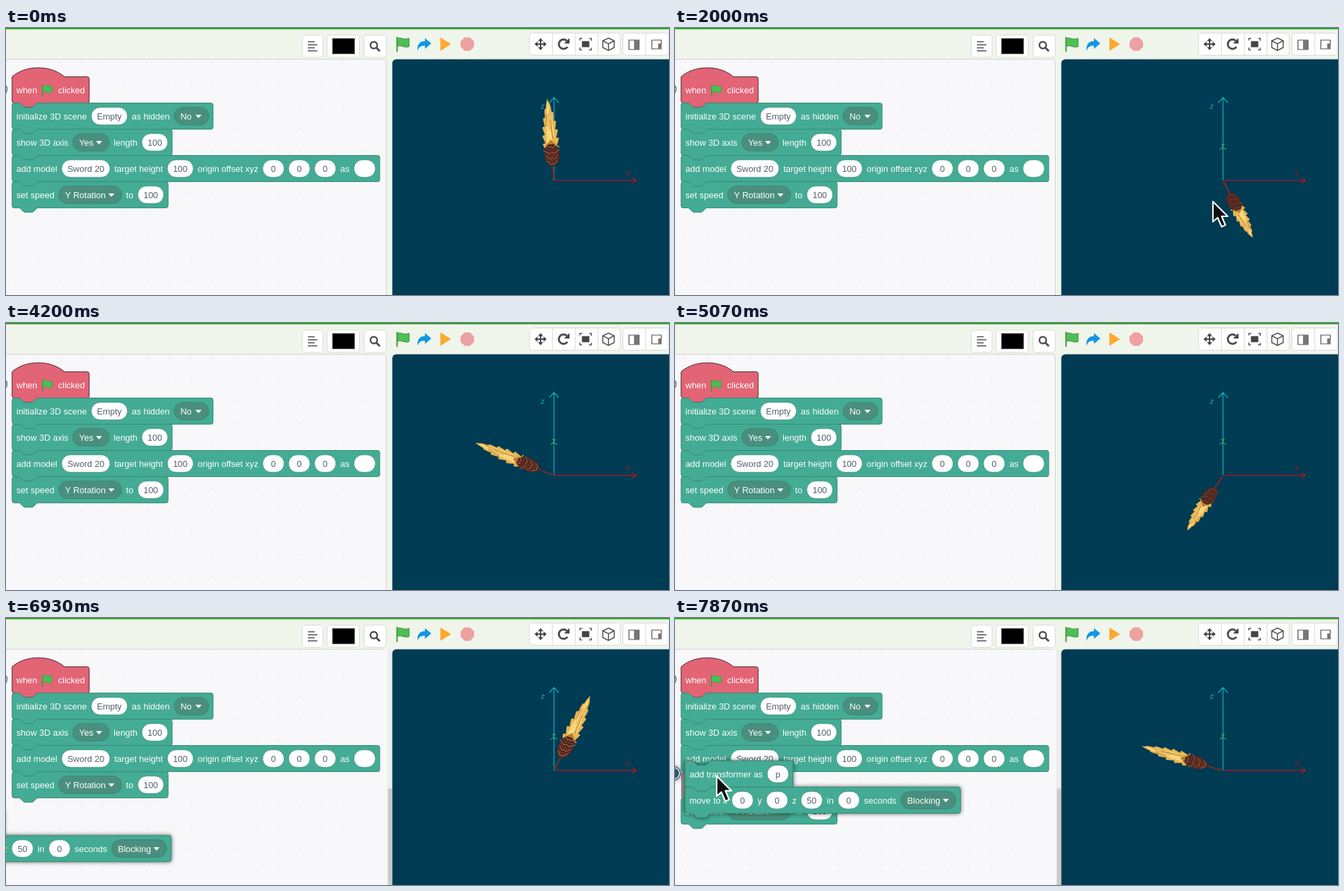
An HTML page for the animation above (8 s loop, 986 by 397 pixels).

```html
<!DOCTYPE html>
<html lang="en">
<head>
<meta charset="utf-8">
<title>Rotating 3D model</title>
<style>
html, body { margin: 0; width: 100%; height: 100%; overflow: hidden; background: #f0f5ec; }
svg { display: block; width: 986px; height: 397px; }
text { font: 13px "Liberation Sans", Arial, sans-serif; fill: #fff; }
.field { fill: #575e75; text-anchor: middle; }
.axis { fill: none; stroke-width: 1.2; }
.label { font-style: italic; font-size: 11px; }
.icon { fill: none; stroke: #4d4d4d; stroke-width: 1.5; }
#group { filter: drop-shadow(0 0 3px rgba(0,0,0,.6)); }
</style>
</head>
<body>
<svg viewBox="0 0 986 397">
  <defs>
    <pattern id="dots" x="14" y="51" width="32.5" height="32.5" patternUnits="userSpaceOnUse">
      <rect width="1.4" height="1.4" fill="#e1e3e6"/>
    </pattern>
    <clipPath id="work"><rect y="47" width="566" height="350"/></clipPath>
  </defs>
  <rect width="986" height="397" fill="#f0f5ec"/>
  <rect width="986" height="2" fill="#34ad28"/>
  <path d="M-2 398V46.500H560.500a5 5 0 0 1 5 5V398" fill="#f8f7fa" stroke="#cdd2cb"/>
  <rect y="47" width="565" height="350" fill="url(#dots)"/>
  <g id="scroll">
    <rect x="561" y="47" width="6" height="350" fill="#f8f7fa"/>
    <rect x="567" y="47" width="8" height="350" fill="#ebeeea"/>
    <path d="M568 397V256a3 3 0 0 1 6 0V397" fill="#c9cbca"/>
  </g>
  <g id="toolbar"></g>
  <path d="M574.500 397V52.500a6 6 0 0 1 6-6H986V397z" fill="#003b54"/>
  <g class="axis">
    <path d="M815 227V104M808 111L815 103.500L822 111" stroke="#08b5c4"/>
    <path d="M815 226.600H937M931 222.600L937.500 226.600L931 230.600" stroke="#c0101a"/>
    <path d="M810 180.500Q815 176.500 820 180.500M812.500 172L814.500 175M817 172L813.500 178" stroke="#35b56b"/>
  </g>
  <text class="label" x="795.500" y="120" style="fill:#1ab3c4">z</text>
  <text class="label" x="922" y="219" style="fill:#a8121c">x</text>
  <g id="sword"></g>
  <g clip-path="url(#work)">
    <g id="stack"></g>
    <rect id="marker" x="9" y="229" width="161" height="39" rx="3" fill="#8d9395"/>
    <g id="speed"></g>
    <g id="group"></g>
  </g>
  <path id="cursor" d="M1 2V32L8 26L14 39.500L19.500 37L14 24H23Z"
    fill="#111" stroke="#fff" stroke-width="2.200" stroke-linejoin="round"/>
</svg>
<script>
const $ = id => document.getElementById(id);
const LOOP = 8000, FRAME = 1000 / 15, LAST = 118;
const UNIT = 0.8125, ROW = 39, GAP = 6.5;

const pen = document.createElement('canvas').getContext('2d');
pen.font = '13px "Liberation Sans", Arial, sans-serif';
const widthOf = s => pen.measureText(s).width;

function flag(x, y, size) {
  return `<g transform="translate(${x} ${y}) scale(${size})">
    <path d="M1.500 1V21" stroke="#45993d" stroke-width="2" stroke-linecap="round"/>
    <path d="M2 2.500C7-.500 10 5.500 19 2.500V14C11 17.500 8 10.500 2 14z" fill="#4cbf56" stroke="#45993d"/></g>`;
}

// Each part returns [width, markup].
const capsule = (x, w, fill, line) =>
  `<rect x="${x}" y="6.500" width="${w}" height="26" rx="13" fill="${fill}" stroke="${line}" stroke-width=".8"/>`;

function word(x, s) {
  return [widthOf(s), `<text x="${x}" y="24.500">${s}</text>`];
}

function input(x, s) {
  const w = Math.max(32, widthOf(s) + 17);
  return [w, capsule(x, w, '#fff', '#3a8f7a') + `<text class="field" x="${x + w / 2}" y="24.500">${s}</text>`];
}

function menu(x, s) {
  const w = Math.max(51.5, widthOf(s) + 33);
  return [w, capsule(x, w, '#4a8f7e', '#38816d') + `<text x="${x + 9.5}" y="24.500">${s}</text>
    <path d="M${x + w - 19} 18h7.500l-3.750 4z" fill="#fff" stroke="#fff" stroke-linejoin="round"/>`];
}

function part(x, token) {
  if (token === '@') return [18, flag(x, 11.5, 0.82)];
  if (token[0] === '(') return input(x, token.slice(1, -1));
  if (token[0] === '[') return menu(x, token.slice(1, -1));
  return word(x, token.trim());
}

function outline(width, hat) {
  const w = width / UNIT;
  const top = hat ? 'M0 0c25-22 71-22 96 0'
    : 'M0 4a4 4 0 0 1 4-4h8c2 0 3 1 4 2l4 4c1 1 2 2 4 2h12c2 0 3-1 4-2l4-4c1-1 2-2 4-2';
  return `${top}H${w - 4}a4 4 0 0 1 4 4v40a4 4 0 0 1-4 4H48c-2 0-3 1-4 2l-4 4c-1 1-2 2-4 2h-12
    c-2 0-3-1-4-2l-4-4c-1-1-2-2-4-2H4a4 4 0 0 1-4-4z`;
}

// Markup of a block: words, (input), [menu], @ for the flag
function block(x, y, label) {
  const hat = label.includes('@');
  const [fill, line] = hat ? ['#e26475', '#3f2b30'] : ['#44ab94', '#348a74'];
  let end = GAP, inner = '';
  for (const token of label.match(/\(.*?\)|\[.*?\]|@|\w[\w ]*/g)) {
    const [w, markup] = part(end, token);
    end += w + GAP;
    inner += markup;
  }
  return `<g transform="translate(${x} ${y - 0.5})">
    <path d="${outline(end, hat)}" transform="scale(${UNIT})" fill="${fill}" stroke="${line}" stroke-width="1.200"/>${inner}</g>`;
}

const stack = (x, y, labels) => labels.map((s, i) => block(x, y + i * ROW, s)).join('');

const badge = (x, y) =>
  `<circle cx="${x}" cy="${y}" r="10.500" fill="#26343a"/>
   <circle cx="${x}" cy="${y}" r="8.700" fill="#285a70" stroke="#fff" stroke-width="1.500"/>`;

$('stack').innerHTML = badge(-8.5, 91) + stack(9, 73, [
  'when @ clicked',
  'initialize 3D scene (Empty) as hidden [No]',
  'show 3D axis [Yes] length (100)',
  'add model (Sword 20) target height (100) origin offset xyz (0) (0) (0) as ()'
]);
$('speed').innerHTML = block(9, 229, 'set speed [Y Rotation] to (100)');
$('group').innerHTML = badge(-2, 231) + stack(15, 213, [
  'add transformer as (p)',
  'move to x (0) y (0) z (50) in (0) seconds [Blocking]'
]);

// Toolbar
const button = (x, y, w, h) =>
  `<rect x="${x + 0.5}" y="${y + 0.5}" width="${w}" height="${h}" rx="4" fill="#fff" stroke="#d8dbd6"/>`;
const icon = (d, style = '') => `<path class="icon" d="${d}" style="${style}"/>`;
const at = (x, y, markup) => `<g transform="translate(${x} ${y})">${markup}</g>`;
const around = markup => [0, 90, 180, 270].map(a => `<g transform="rotate(${a})">${markup}</g>`).join('');
const solid = (d, fill = '#444') => `<path d="${d}" fill="${fill}"/>`;

$('toolbar').innerHTML =
  button(440, 10, 31, 33) + button(477, 10, 48, 33) + button(532, 10, 33, 33) +
  button(778, 7, 135, 33) + button(917, 7, 67.5, 33) +
  [812.5, 846.5, 880.5, 951.5].map(x => icon(`M${x} 8V40`, 'stroke:#d8dbd6;stroke-width:1')).join('') +
  [0, 1, 2, 3].map(i => icon(`M449 ${20.5 + i * 4.5}h${i % 2 ? 14 : 10}`)).join('') +
  '<rect x="485.500" y="15.500" width="33" height="23" stroke="#777"/>' +
  at(547, 25.5, '<circle class="icon" r="5" style="stroke-width:2.500"/>' + icon('M4 4l5 5', 'stroke-width:3')) +
  flag(580, 13, 1.03) +
  solid('M612 34C611 24 616 19.500 623 19.500V15L632.500 23L623 31V26.500C617 26 614 28 612 34z', '#1297e3') +
  solid('M646 14L662 24L646 34z', '#ffa92e') +
  solid('M682 14h8l6 6v8l-6 6h-8l-6-6v-8z', '#eda1a1') +
  at(795, 24, around(solid('M0-9L4-4.500H1V0H-1V-4.500H-4z'))) +
  at(829, 24, icon('M5-5A7 7 0 1 0 6 4', 'stroke-width:3') + solid('M9-9V-1H1z')) +
  at(862, 24, around(icon('M5.500-8.500H8.500V-5')) + solid('M-5.500-4.500h11v9h-11z')) +
  at(896, 24, icon('M0-9L8.500-5V5L0 9.500L-8.500 5V-5zM-8.500-5L0-.500L8.500-5M0-.500V9')) +
  at(934, 25, icon('M-7.500-7h15V7h-15z', 'stroke-width:1.200') + solid('M0-7h7.500V7H0z', '#777')) +
  at(968, 25, icon('M-7.500-7h14V6h-14z', 'stroke-width:1.200') + solid('M2-2h5v8h-5z', '#777'));

// Sword, as [across, along] in percent of its length
function seeded(seed) {
  return () => (seed = seed * 16807 % 2147483647) / 2147483647;
}

function body(from, to, half) {
  const left = [], right = [];
  for (let u = from; u <= to; u++) {
    left.push([-half(u, 0), u]);
    right.unshift([half(u, 0.45), u]);
  }
  return left.concat(right);
}

const barb = (u, size, phase) => (u / size + phase) % 1;
const bladeHalf = (u, phase) => 9 * (1 - ((u - 44) / 56) ** 2.4) * (0.7 + 0.4 * barb(u, 10, phase));
const guardHalf = (u, phase) => 1 + 9 * Math.sin(Math.PI * (u - 19) / 31) ** 0.7 * (0.7 + 0.4 * barb(u, 6, phase));

const blade = body(44, 100, bladeHalf);
const shine = body(50, 96, u => 4.2 * (1 - ((u - 50) / 46) ** 2) + 0.3);
const root = body(44, 54, u => 8 * (1 - (u - 44) / 10));
const guard = body(20, 48, guardHalf);
const grip = body(3, 21, u => 1 + Math.max(0, 6 - u) / 2);

const random = seeded(7);
const streaks = Array.from({ length: 9 }, () => {
  const u = 45 + random() * 30, v = (random() - 0.5) * 11;
  return [[v, u], [v * 0.6, u + 10 + random() * 10]];
});
const ribs = Array.from({ length: 7 }, (_, i) => {
  const u = 24 + i * 3.6, w = guardHalf(u, random());
  return [[-w, u + 3], [-w * 0.3, u - 2], [0, u], [w * 0.3, u - 2], [w, u + 3]];
});

// The model turns in a plane seen slightly from above, with perspective.
function projector(angle) {
  const s = Math.sin(angle), c = Math.cos(angle);
  return ([v, u]) => {
    const x = (u * s + v * c) / 100, z = (u * c - v * s) / 100, k = 1 / (1 - 0.14 * z);
    return `${(815 + 122 * x * k).toFixed(2)} ${(227 - 105 * z * k).toFixed(2)}`;
  };
}

function drawSword(seconds) {
  const angle = -(4 + 100 * seconds) * Math.PI / 180;
  const project = projector(angle), light = 0.65 + 0.3 * Math.cos(angle);
  const line = pts => 'M' + pts.map(project).join('L');
  const shape = (pts, fill) => solid(line(pts) + 'z', fill);
  const stroke = (pts, color, opacity) =>
    `<path d="${line(pts)}" fill="none" stroke="${color}" opacity="${opacity}"/>`;
  $('sword').innerHTML = shape(grip, '#6d2d27') + shape(blade, '#e8b650') + shape(shine, '#fbd67c') +
    shape(root, '#bd7a30') + streaks.map(p => stroke(p, '#b67e2e', 0.7)).join('') + shape(guard, '#4b2420') +
    ribs.map((p, i) => stroke(p, i % 2 ? '#99412f' : '#c98443', light)).join('');
}

// Key points [ms, x, y] of the pointer and of the dragged blocks
const pointer = [[400, 101, 29], [950, 222, 260], [1700, 222, 260], [2000, 799, 256],
  [2500, 829, 226], [3700, 829, 226], [4070, 250, 320]];
const drag = [[6530, -450, 77], [6933, -179, 72], [7330, -30, -156], [7867, 0, 0]];

function along(keys, t) {
  const i = Math.max(1, keys.findIndex(k => t <= k[0]));
  const [t0, x0, y0] = keys[i - 1], [t1, x1, y1] = keys[i];
  const p = Math.min(1, Math.max(0, (t - t0) / (t1 - t0)));
  return [x0 + (x1 - x0) * p, y0 + (y1 - y0) * p];
}

const show = (id, on) => $(id).setAttribute('visibility', on ? 'visible' : 'hidden');
const move = (id, x, y) => $(id).setAttribute('transform', `translate(${x.toFixed(2)} ${y.toFixed(2)})`);

function draw(ms) {
  const t = Math.min(LAST, Math.floor((ms + 3.4) / FRAME)) * FRAME;
  drawSword(t / 1000);

  const dragging = t >= 6530, [dx, dy] = along(drag, Math.min(t, 7867));
  const snapping = dragging && Math.hypot(dx, dy) < 35;
  move('group', dx, dy);
  show('group', dragging);
  show('marker', snapping);
  move('speed', 0, snapping ? ROW : 0);
  show('scroll', t >= 5790);

  const [x, y] = dragging ? [61 + dx, 233 + dy] : along(pointer, Math.min(t, 4070));
  move('cursor', x, y);
  show('cursor', dragging || (t >= 400 && t < 4080));
}

let start;
function tick(now) {
  start ??= now;
  draw((now - start) % LOOP);
  requestAnimationFrame(tick);
}
draw(0);
requestAnimationFrame(tick);
</script>
</body>
</html>
```
